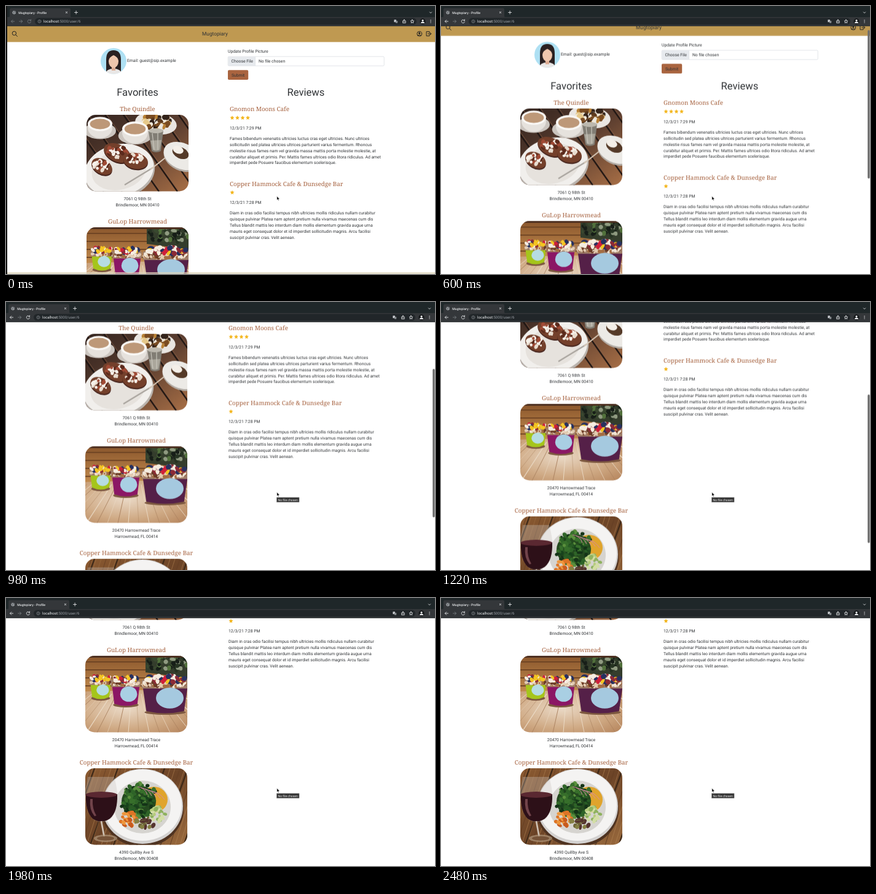
These frames come from a looping animation (698 px wide and 436 px high, 2980 ms). An HTML page:

```html
<!DOCTYPE html>
<html lang="en">
<head>
<meta charset="utf-8">
<title>Profile</title>
<style>
  html, body { margin: 0; width: 100%; height: 100%; overflow: hidden; background: #111; }
  svg { display: block; width: 100vw; height: 100vh; }
  text { font-family: Roboto, sans-serif; font-size: 6.8px; fill: #303336; text-rendering: geometricPrecision; white-space: pre; }
  .name { font-family: "Noto Serif", serif; font-size: 9.8px; fill: #a5603d; }
  .big { font-size: 16.6px; }
  .brand { font-size: 8.3px; }
  .mid { text-anchor: middle; }
  .tab { font-size: 5.2px; font-weight: 500; fill: #e4e6e8; }
  .url { font-size: 6.1px; fill: #9aa0a6; }
  .url tspan { fill: #eceef0; }
  .tip { font-size: 5.1px; fill: #f2f2f2; text-anchor: middle; }
  .line { fill: none; stroke: #222; stroke-width: 1; stroke-linecap: round; stroke-linejoin: round; }
  .ui { fill: none; stroke: #dfe1e4; stroke-width: .9; stroke-linecap: round; stroke-linejoin: round; }
  .dim { stroke: #777c80; }
</style>
</head>
<body>
<svg viewBox="0 0 698 436" preserveAspectRatio="none">
  <defs>
    <clipPath id="card"><rect width="166" height="124.5" rx="15"/></clipPath>
    <clipPath id="face"><circle cx="173" cy="89.5" r="21"/></clipPath>
    <linearGradient id="deck" x1="0" y1="0" x2="1" y2="1">
      <stop offset="0" stop-color="#33241f"/><stop offset=".5" stop-color="#5a3d2f"/><stop offset="1" stop-color="#a86f46"/>
    </linearGradient>
    <radialGradient id="table" cx=".4" cy=".45" r=".75">
      <stop offset="0" stop-color="#ead9c6"/><stop offset=".6" stop-color="#d0ab86"/><stop offset="1" stop-color="#b98a62"/>
    </radialGradient>
    <linearGradient id="fence" x1="0" y1="0" x2="0" y2="1">
      <stop offset="0" stop-color="#8a562c"/><stop offset="1" stop-color="#c48d50"/>
    </linearGradient>
    <linearGradient id="board" x1="0" y1="0" x2="1" y2="1">
      <stop offset="0" stop-color="#8b5a31"/><stop offset=".5" stop-color="#6c4427"/><stop offset="1" stop-color="#9a6a3d"/>
    </linearGradient>
  </defs>
  <g id="win">
    <rect y="32" width="698" height="404" fill="#fff"/>
    <g id="page"></g>
    <rect id="dock" y="433" width="698" height="3" fill="#ded6bd"/>
    <rect id="thumb" x="694.2" y="33" width="3.4" height="241.5" rx="1.7" fill="#6c6c6c"/>
    <g id="bar"></g>
  </g>
  <g id="tip">
    <rect x="440.5" y="318" width="36.5" height="7.6" fill="#353535" stroke="#777" stroke-width=".6"/>
    <text class="tip" x="458.7" y="323.6">No file chosen</text>
  </g>
  <path d="M440.8 309.6v6l1.4-1.2 1 2.2 1-.4-.9-2.2h1.9z" fill="#000" stroke="#fff" stroke-width=".5"/>
</svg>
<script>
const LOOP = 2980;
const $ = id => document.getElementById(id);

let seed = 7;
const rnd = (a, b) => {
  seed = (seed * 16807) % 2147483647;
  return a + (b - a) * seed / 2147483647;
};
const many = (n, f) => Array.from({ length: n }, (_, i) => f(i)).join('');

const text = (x, y, s, cls = '') => `<text x="${x}" y="${y}" class="${cls}">${s}</text>`;
const rect = (x, y, w, h, fill, more = '') => `<rect x="${x}" y="${y}" width="${w}" height="${h}" fill="${fill}" ${more}/>`;
const oval = (x, y, rx, ry, fill, turn = 0) =>
  `<ellipse cx="${x}" cy="${y}" rx="${rx}" ry="${ry}" fill="${fill}" transform="rotate(${turn} ${x} ${y})"/>`;
const shape = (d, fill) => `<path d="${d}" fill="${fill}"/>`;
const stroke = (d, color, w = 1) => `<path d="${d}" fill="none" stroke="${color}" stroke-width="${w}"/>`;
const icon = (d, cls) => `<path d="${d}" class="${cls}"/>`;
const pick = list => list[Math.floor(rnd(0, list.length))];
const dots = (n, x, y, rx, ry, size, colors) => many(n, () => {
  const a = rnd(0, 6.283), r = Math.sqrt(rnd(0, 1));
  return oval(x + Math.cos(a) * r * rx, y + Math.sin(a) * r * ry,
    rnd(.5, 1) * size, rnd(.35, .75) * size, pick(colors), rnd(0, 180));
});
const star = (x, y) => {
  const p = many(10, i => {
    const r = i % 2 ? 1.7 : 3.7, a = i * Math.PI / 5;
    return `${(x + r * Math.sin(a)).toFixed(2)},${(y - r * Math.cos(a)).toFixed(2)} `;
  });
  return `<polygon points="${p}" fill="#f3b51b"/>`;
};

function brunch() {
  const cup = (x, y, r) => oval(x, y + 10, r * 1.3, r * .68, '#cbc5bf') + oval(x, y + 5, r, r * .85, '#e6e2dd') +
    oval(x, y - 1, r, r * .58, '#faf8f5') + oval(x, y - 1, r * .82, r * .42, '#bd9878');
  const toast = (x, y, rx, ry, turn) => oval(x, y + 2, rx, ry, '#43211a', turn) + oval(x, y, rx, ry, '#74402b', turn) +
    dots(26, x, y - 2, rx * .75, ry * .65, 4.5, ['#f6f1ea', '#f6f1ea', '#e9ddd0', '#a04a35', '#5b2a1c']);
  return rect(0, 0, 166, 125, 'url(#deck)') +
    many(9, i => stroke(`M${i * 30 - 60} 0l88 125`, '#211714', 2.4) + stroke(`M${i * 30 - 57} 0l88 125`, '#8d6248', .7)) +
    oval(113, 14, 34, 18, '#e9e6e2', 8) +
    dots(50, 113, 10, 24, 12, 6, ['#5d3a1d', '#b98236', '#e6c98a', '#f1eadc', '#33231a', '#7a4c22']) +
    cup(22, 16, 20) + cup(79, 24, 21) +
    oval(155, 70, 31, 21, '#b3aca5', 25) + oval(155, 67, 31, 21, '#eceae6', 25) +
    oval(153, 62, 14, 9, '#553a28', 25) + oval(149, 57, 9, 6, '#f4efe8', 20) +
    shape('M101 27l24-2-4 34q-8 4-15 0z', '#817d74') + shape('M104 42l18-1-3 16q-6 3-11 0z', '#aaa69b') +
    stroke('M107 30l3 27M116 29v28', '#c9c6bd', 1.2) + oval(113, 26, 12, 4, '#bcb8ae') +
    oval(54, 93, 58, 43, '#b9b3ad', -14) + oval(53, 90, 57, 42, '#f1efec', -14) + oval(53, 90, 45, 32, '#e6e2dd', -14) +
    toast(50, 62, 23, 14, 25) + toast(80, 75, 20, 13, 10) + toast(25, 84, 18, 12, 30) +
    stroke('M62 114l46-28', '#aaa59f', 2.2) + stroke('M104 89l24-19', '#d8c9b8', 2);
}

function bowls() {
  const tub = (x, y, w, h, fill, badge) => {
    const r = w / 2;
    return oval(x, y + h + 2, r * .9, 4, '#7d5840') +
      shape(`M${x - r} ${y}h${w}l${-w * .09} ${h}q${-w * .41} 7 ${-w * .82} 0z`, fill) +
      rect(x - r - 1, y - 4, w + 2, h * .22 + 4, '#a07f6a', 'rx="3"') +
      dots(Math.round(w), x, y + h * .06, r * .95, h * .08, w * .04 + 2, ['#e3cbb0', '#6b3b26', '#a56d42', '#f0e4d4']) +
      dots(Math.round(w * .8), x, y - 5, r * .88, 5, w * .05 + 2.5,
        ['#cf1f3a', '#f4c521', '#27315f', '#f5ede0', '#f5ede0', '#8c2a36']) +
      oval(x + w * .1, y + h * .55, w * .3, h * .36, badge);
  };
  return rect(0, 0, 166, 60, 'url(#fence)') + many(4, i => rect(0, i * 13 + 9, 166, 1.8, '#6d4323')) +
    shape('M98 0h68v36l-68-9z', '#343d2c') +
    dots(75, 133, 10, 38, 14, 5, ['#263322', '#52713c', '#8f9a80', '#171e18', '#39482f']) +
    rect(0, 0, 166, 3, '#4d3021') +
    shape('M0 58l166-4v71H0z', 'url(#table)') +
    many(22, i => stroke(`M${i * 17 - 100} 125L${i * 8 - 5} 62`, i % 2 ? '#a9805e' : '#ecdcc8', rnd(.4, 1.3))) +
    tub(25, 42, 34, 25, '#a5c51b', '#b6dce2') + tub(66, 43, 46, 35, '#8b1765', '#a9cfe3') +
    tub(130, 43, 75, 47, '#552048', '#a5c9df');
}

function salad() {
  return rect(0, 0, 166, 125, 'url(#board)') +
    many(6, i => stroke(`M${i * 38 - 30} 125l45-125`, '#3c2818', 2.2)) +
    many(26, i => stroke(`M${i * 8 - 30} 125l40-125`, i % 3 ? '#a87a4c' : '#55351f', rnd(.3, .9))) +
    oval(93, 67, 67, 61, '#4e3220') + oval(93, 62, 66, 61, '#d3d1d0') + oval(93, 60, 64, 58, '#f4f3f2') +
    oval(93, 63, 46, 43, '#d6d4d0') + oval(112, 51, 22, 21, '#e0a42c') + oval(87, 54, 28, 26, '#24491f') +
    dots(110, 88, 53, 30, 28, 5, ['#285b24', '#376f2b', '#18421c', '#5b8f3d', '#2f6428', '#143317']) +
    dots(28, 118, 73, 12, 13, 5, ['#b5cc7c', '#d3dea5', '#8fb25f']) +
    dots(24, 70, 82, 14, 12, 5, ['#dd7426', '#ee963c', '#c75a1f']) +
    dots(18, 98, 88, 16, 8, 5, ['#6d6437', '#55342f', '#858043']) +
    many(5, i => stroke(`M${85 + i * 6} ${30 + i * 2}q12 1 ${16 + i} 13`, '#d98aa4', 1)) +
    shape('M4 14q-11 48 9 69 14 9 29-1 18-20 5-68z', '#c9c2bd55') +
    shape('M1 43q24 5 51-1 1 29-12 40-14 9-28 0Q0 70 1 43z', '#2d1018') +
    oval(26, 43, 25.5, 5, '#5a2831') + shape('M8 50q-2 17 7 28l3-1Q11 66 12 50z', '#71434a') +
    stroke('M26 86l5 27', '#cfc2b5', 2.6) + oval(33, 114, 19, 6, '#b49c82aa') + oval(33, 114, 14, 3.5, '#765338');
}

function favorite(y, name, draw, street, city) {
  return text(212, y, name, 'name mid') +
    `<g transform="translate(129 ${y + 6})" clip-path="url(#card)">${draw()}</g>` +
    text(212, y + 144.5, street, 'mid') + text(212, y + 154.5, city, 'mid');
}

function review(y, name, stars, date, lines) {
  return text(362, y, name, 'name') + many(stars, i => star(366 + i * 8.5, y + 11)) +
    text(362, y + 29.8, date) + lines.map((s, i) => text(362, y + 46.6 + i * 9.97, s)).join('');
}

$('page').innerHTML =
  rect(0, 32, 698, 26.6, '#bf9951') +
  text(338, 48, 'Mugtopiary', 'brand mid') +
  icon('M14.6 44.4a3.2 3.2 0 1 1-6.4 0a3.2 3.2 0 1 1 6.4 0M13.8 46.8l2.6 2.7', 'line') +
  icon('M674.6 45.2a3.9 3.9 0 1 1-7.8 0a3.9 3.9 0 1 1 7.8 0M668 48q2.7-2.4 5.4 0', 'line') + oval(670.7, 44.2, 1.5, 1.6, '#222') +
  icon('M687 43.6v-1.9h-5v7h5v-1.9M684.6 45.2h5.2m-1.7-1.7 1.7 1.7-1.7 1.7', 'line') +
  `<g clip-path="url(#face)">${rect(150, 66, 46, 46, '#aee0f3') +
    shape('M161 107V87q0-15 12-15t12 15v20z', '#2a2021') + shape('M158 112q3-10 15-10t15 10z', '#e9e7e6') +
    rect(170, 96, 6, 9, '#dcab92') + oval(173, 90, 8, 10.5, '#efc6ad') +
    shape('M164 90q0-13 9-14 9 1 9 14-3-8-9-10-6 2-9 10z', '#2a2021')}</g>` +
  text(195, 91.3, 'Email: guest@sip.example') +
  text(359, 75.6, 'Update Profile Picture') +
  rect(359.2, 82.2, 254, 15.2, '#fff', 'rx="1.6" stroke="#ced4da" stroke-width=".6"') +
  rect(359.5, 82.5, 44, 14.6, '#e7eaee', 'rx="1.4"') + rect(403.3, 82.5, .5, 14.6, '#ced4da') +
  text(364.5, 92.2, 'Choose File') + text(409, 92.2, 'No file chosen') +
  rect(359, 104.2, 33.2, 15.8, '#a9643f', 'rx="1.8"') + text(375.6, 114.6, 'Submit', 'mid') +
  text(212, 145.8, 'Favorites', 'big mid') + text(486, 145.8, 'Reviews', 'big mid') +
  favorite(171, 'The Quindle', brunch, '7061 Q 98th St', 'Brindlemoor, MN 00410') +
  favorite(354, 'GuLop Harrowmead', bowls, '20470 Harrowmead Trace', 'Harrowmead, FL 00414') +
  favorite(537, 'Copper Hammock Cafe &amp; Dunsedge Bar', salad, '4390 Quillby Ave S', 'Brindlemoor, MN 00408') +
  review(171, 'Gnomon Moons Cafe', 4, '12/3/21 7:29 PM', [
    'Fames bibendum venenatis ultricies luctus cras eget ultricies. Nunc ultrices',
    'sollicitudin sed platea ultricies ultrices parturient varius fermentum. Rhoncus',
    'molestie risus fames nam vel gravida massa mattis porta molestie molestie, at',
    'curabitur aliquet et primis. Per. Mattis fames ultrices odio litora ridiculus. Ad amet',
    'imperdiet pede Posuere faucibus elementum scelerisque.']) +
  review(292.5, 'Copper Hammock Cafe &amp; Dunsedge Bar', 1, '12/3/21 7:28 PM', [
    'Diam in cras odio facilisi tempus nibh ultricies mollis ridiculus nullam curabitur',
    'quisque pulvinar Platea nam aptent pretium nulla vivamus maecenas cum dis',
    'Tellus blandit mattis leo interdum diam mollis elementum gravida augue urna',
    'mauris eget consequat dolor et id imperdiet sollicitudin magnis. Arcu facilisi',
    'suscipit pulvinar cras. Velit aenean.']);

const arrows = cls =>
  icon('M11.6 25H6.6m2.2-2.3L6.5 25l2.3 2.3', cls) +
  icon('M38.3 23.6a2.7 2.7 0 1 0 .3 2.2M38.5 22v1.9h-1.9', cls);

$('bar').innerHTML =
  rect(0, 0, 700, 18.5, '#1f2729') +
  shape('M2 18.5q2 0 2-3V6q0-2.5 2.5-2.5h94q2.5 0 2.5 2.5v9.5q0 3 2 3z', '#34373a') +
  rect(0, 18, 700, 14.7, '#34373a') + rect(0, 32.2, 700, .6, '#26292b') +
  oval(11.2, 10.6, 2.8, 2.8, '#a4a9ad') + stroke('M9 9.3l2 1.2v2.4M11.5 8l.5 1.6 1.8.8', '#34373a', .8) +
  text(18.3, 12.5, 'Mugtopiary - Profile', 'tab') +
  icon('M95.3 9.3l2.4 2.4m0-2.4-2.4 2.4', 'ui') + icon('M109.6 10.5h5M112.1 8v5', 'ui') +
  icon('M687.4 9.9l1.6 1.6 1.6-1.6', 'ui') +
  rect(45, 19.6, 621, 11, '#212629', 'rx="5.5"') +
  icon('M19.6 25h5m-2.2-2.3 2.3 2.3-2.3 2.3', 'ui dim') +
  `<g id="idle">${arrows('ui dim')}</g><g id="live">${arrows('ui')}</g>` +
  icon('M55 25a2.5 2.5 0 1 1-5 0a2.5 2.5 0 1 1 5 0M52.5 24.8v1.3M52.5 23.6v.1', 'ui dim') +
  text(59, 27.2, '<tspan>localhost:</tspan>5000/user/6', 'url') +
  rect(629.4, 22.3, 3.6, 4, '#c9ccd0', 'rx=".5"') + rect(632, 24, 3.2, 3.8, '#858a8e', 'rx=".5"') +
  icon('M644.6 24.2h-1v3.4h4.6v-3.4h-1M645.9 26v-3.8m-1.2 1 1.2-1.1 1.2 1.1', 'ui') +
  icon('M659 22.2l.9 1.8 2 .3-1.5 1.4.4 2-1.8-1-1.8 1 .4-2-1.5-1.4 2-.3z', 'ui') +
  oval(676, 25, 4.7, 4.7, '#171a1c') + oval(676, 23.6, 1.5, 1.6, '#eef0f2') + shape('M673 28q0-2.5 3-2.5t3 2.5z', '#eef0f2') +
  many(3, i => oval(689, 22.9 + i * 2.1, .7, .7, '#dfe1e4'));

// steps: [ms, value]
function run(id, prop, steps, map = v => v) {
  const all = [...steps];
  if (all[0][0] > 0) all.unshift([0, all[0][1]]);
  all.push([LOOP, all[all.length - 1][1]]);
  const anim = $(id).animate(all.map(([t, v]) => ({ offset: t / LOOP, [prop]: map(v) })),
    { duration: LOOP, iterations: Infinity });
  anim.startTime = start;
}
const start = document.timeline.currentTime ?? 0;
const scroll = [[520, 0], [560, 3], [600, 10], [700, 38], [840, 84], [980, 125], [1100, 160],
  [1220, 194], [1340, 226], [1440, 250], [1500, 261], [1540, 266.6], [1640, 266]];

run('win', 'transform', [[0, 2], [60, 1], [120, .3], [180, 0]], v => `translateX(${v}px)`);
run('page', 'transform', scroll, v => `translateY(${-v}px)`);
run('thumb', 'transform', scroll, v => `translateY(${v * .605}px)`);
run('thumb', 'opacity', [[520, 0], [560, 1], [1760, 1], [1920, 0]]);
run('dock', 'opacity', [[0, .7], [160, 0]]);
run('idle', 'opacity', [[260, 1], [260, 0]]);
run('live', 'opacity', [[260, 0], [260, 1]]);
run('tip', 'opacity', [[760, 0], [760, 1]]);
</script>
</body>
</html>
```
